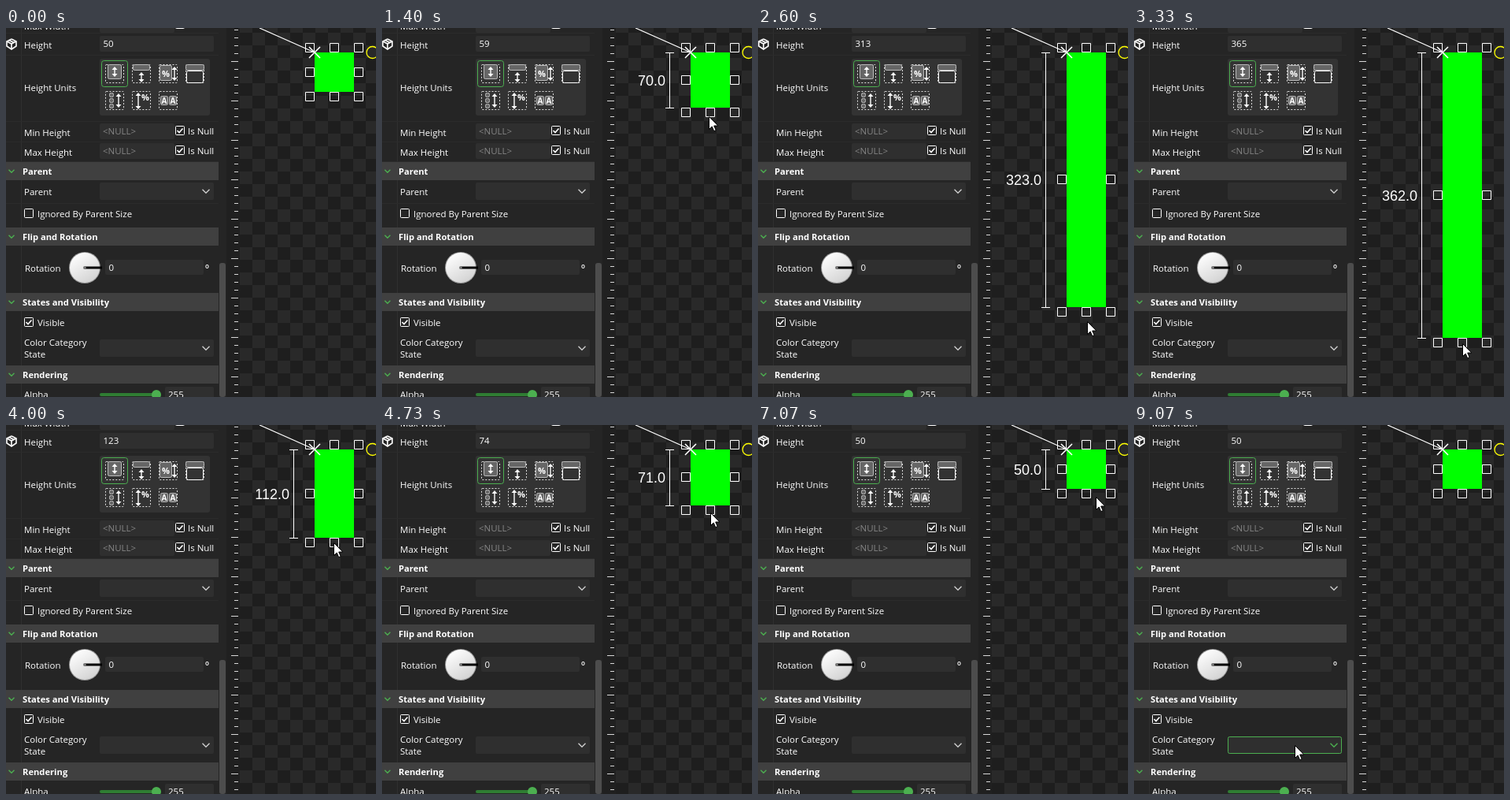
An HTML page with a canvas for the animation above (9140 ms loop, 470 by 468 pixels).

```html
<!DOCTYPE html>
<html lang="en">
<head>
<meta charset="utf-8">
<title>Height resize</title>
<style>
  html, body { margin: 0; width: 100%; height: 100%; overflow: hidden; background: #252525; }
  canvas { display: block; }
</style>
</head>
<body>
<canvas id="stage" width="470" height="468"></canvas>
<script>
const ctx = document.getElementById('stage').getContext('2d');
const LOOP = 9140, STEP = 200 / 3, LAST = 136;
const GREEN = '#4caf50', INK = '#fff', FIELD = '#2f2f2f';

// step, cursor x, cursor y, box height
const track = [
  [1, 462, 196, 50], [11, 412, 89, 50], [12, 412, 89, 50], [15, 416, 89, 50],
  [18, 416, 89, 50], [31, 419, 301, 237], [47, 418, 407, 367], [50, 418, 401, 362],
  [60, 417, 150, 112], [64, 417, 139, 99], [74, 418, 104, 63], [84, 419, 96, 55],
  [88, 419, 95, 54], [92, 419, 95, 54], [99, 422, 93, 51], [104, 422, 93, 51],
  [105, 426, 92, 50], [106, 430, 92, 50], [112, 430, 92, 50], [122, -14, 407, 50],
  [134, 214, 500, 50], [135, 210, 455, 50], [136, 205, 407, 50]
];

const slope = (i, c) => (track[i + 1][c] - track[i][c]) / (track[i + 1][0] - track[i][0]);
function tangent(i, c) {
  if (i < 1 || i >= track.length - 1) return 0;
  const a = slope(i - 1, c), b = slope(i, c);
  return a * b > 0 ? 2 * a * b / (a + b) : 0;
}

// Monotone cubic through the track
function sample(k, c) {
  if (k <= track[0][0]) return track[0][c];
  let i = 0;
  while (i < track.length - 2 && k > track[i + 1][0]) i++;
  const span = track[i + 1][0] - track[i][0], u = (k - track[i][0]) / span, v = 1 - u;
  return Math.round(v * v * (1 + 2 * u) * track[i][c] + u * u * (3 - 2 * u) * track[i + 1][c]
    + span * u * v * (v * tangent(i, c) - u * tangent(i + 1, c)));
}

function fill(x, y, w, h, color, r = 0) {
  ctx.fillStyle = color;
  ctx.beginPath();
  ctx.roundRect(x, y, w, h, r);
  ctx.fill();
}

function frame(x, y, w, h, color = INK, r = 0) {
  ctx.strokeStyle = color;
  ctx.lineWidth = 1;
  ctx.beginPath();
  ctx.roundRect(x + .5, y + .5, w - 1, h - 1, r);
  ctx.stroke();
}

function path(points, color = INK, width = 1) {
  ctx.strokeStyle = color;
  ctx.lineWidth = width;
  ctx.beginPath();
  for (let i = 0; i < points.length; i += 2) ctx.lineTo(points[i], points[i + 1]);
  ctx.stroke();
}

function disc(x, y, r, color) {
  ctx.fillStyle = color;
  ctx.beginPath();
  ctx.arc(x, y, r, 0, 7);
  ctx.fill();
}

function text(s, x, y, { color = INK, font = '500 11.5px "Open Sans", sans-serif', align = 'left' } = {}) {
  ctx.font = font;
  ctx.fillStyle = color;
  ctx.textAlign = align;
  ctx.fillText(s, x, y);
}

const chevron = (x, y, r, color) => path([x - r, y - r / 2, x, y + r / 2, x + r, y - r / 2], color, 1.4);

function checkbox(x, y, on) {
  frame(x, y, 12, 12, INK, 1);
  if (on) path([x + 2.5, y + 6, x + 5, y + 8.5, x + 9.5, y + 3.5], INK, 1.6);
}

function combo(y, hot) {
  fill(119, y, 145, 22, FIELD, 2);
  if (hot) frame(119, y, 145, 22, GREEN, 2);
  chevron(254, y + 11, 4.5, hot ? GREEN : '#ccc');
}

function header(s, y) {
  fill(0, y, 270, 23, '#404040');
  chevron(7, y + 11.5, 3.5, GREEN);
  text(s, 21, y + 16, { font: '700 11.2px "Open Sans", sans-serif' });
}

function nullable(s, y) {
  text(s, 23, y + 4);
  fill(119, y - 12, 95, 20, FIELD, 2);
  text('<NULL>', 123, y + 2, { color: '#858585' });
  checkbox(215, y - 9, true);
  text('Is Null', 231, y + 2);
}

function updown(x, top, bottom) {
  path([x, top + 3, x, bottom - 3], INK, 1.4);
  ctx.fillStyle = INK;
  for (const [tip, base] of [[top, top + 4], [bottom, bottom - 4]]) {
    ctx.beginPath();
    ctx.moveTo(x, tip);
    ctx.lineTo(x + 3.5, base);
    ctx.lineTo(x - 3.5, base);
    ctx.fill();
  }
}

function icon(x, y, draw) {
  ctx.save();
  ctx.translate(x, y);
  ctx.setLineDash([2, 2]);
  frame(-12, -12, 24, 24, '#e0e0e0', 1);
  ctx.setLineDash([]);
  draw();
  ctx.restore();
}

function block(x, y, w, h) {
  fill(x, y, w, h, '#666', 2);
  frame(x, y, w, h, '#bbb', 2);
}

const glyph = (s, x, y, size) =>
  text(s, x, y, { font: `700 ${size}px "Open Sans", sans-serif`, align: 'center' });

function unitIcons() {
  fill(119, 39, 140, 72, '#333', 3);
  frame(121, 41, 34, 34, GREEN, 3);
  icon(138, 58, () => { block(-9, -12, 18, 19); updown(0, -9, 4); });
  icon(172, 58, () => { block(-11, -12, 22, 8); updown(0, -2, 11); });
  icon(206, 58, () => { block(-11, -11, 16, 20); glyph('%', -3, 4, 11); updown(8, -9, 9); });
  icon(240, 58, () => { block(-12, -12, 24, 8); frame(-11, -4, 22, 16, INK, 2); });
  icon(138, 92, () => { for (const y of [-10, -3, 4]) block(-7, y, 6, 6); updown(5, -9, 9); });
  icon(172, 92, () => { updown(-4, -10, 11); glyph('%', 5, 0, 11); });
  icon(206, 92, () => {
    for (const x of [-10, 1]) { block(x, -6, 10, 12); glyph('A', x + 5, 4, 10); }
  });
}

function cube() {
  path([7, 14, 13, 17, 13, 23, 7, 27, 1, 23, 1, 17, 7, 14], INK, 1.6);
  path([1, 17, 7, 20, 13, 17], INK, 1.6);
  path([7, 20, 7, 27], INK, 1.6);
  path([4, 15.5, 10, 18.5], INK, 1.6);
}

function dial() {
  const shade = ctx.createLinearGradient(88, 286, 110, 322);
  shade.addColorStop(0, '#fff');
  shade.addColorStop(1, '#d2d2d2');
  disc(100, 304, 20, '#999');
  disc(100, 304, 19, shade);
  path([100, 304, 122, 304], '#000', 3);
  disc(100, 304, 2, '#777');
}

function panel(height, hot) {
  fill(0, 0, 280, 468, '#252525');
  fill(19, 0, 1, 468, '#303030');
  for (const y of [6, 34, 118, 144, 169, 222]) fill(0, y, 270, 1, '#2b2b2b');
  nullable('Max Width', -2);
  cube();
  text('Height', 23, 26);
  fill(119, 10, 145, 20, FIELD, 2);
  text(height, 123.5, 23.5);
  text('Height Units', 23, 80);
  unitIcons();
  nullable('Min Height', 133);
  nullable('Max Height', 158);

  header('Parent', 170);
  text('Parent', 23, 212);
  combo(196);
  checkbox(23, 229);
  text('Ignored By Parent Size', 40, 240);

  header('Flip and Rotation', 253);
  text('Rotation', 24, 309);
  dial();
  fill(126, 294, 125, 19, FIELD, 2);
  text('0', 130.5, 308);
  text('º', 253, 309, { font: '600 13px "Open Sans", sans-serif' });

  header('States and Visibility', 336);
  checkbox(23, 367, true);
  text('Visible', 40, 378);
  text('Color Category', 23, 403);
  text('State', 23, 418);
  combo(395, hot);

  header('Rendering', 428);
  text('Alpha', 23, 469);
  fill(119, 463, 72, 4, '#2f7d33', 2);
  disc(191, 465, 6, GREEN);
  fill(202, 455, 62, 20, FIELD, 2);
  text('255', 206, 469);
  fill(271, 298, 8, 170, '#4d4d4d', 3);
}

function backdrop() {
  fill(280, 0, 190, 468, '#1e1e1e');
  for (let y = 0; y < 30; y++)
    for (let x = y % 2; x < 11; x += 2) fill(297 + x * 16, y * 16 - 10, 16, 16, '#292929');
  fill(280, 0, 17, 468, '#202020');
  for (let y = 2; y < 468; y += 10) {
    const size = y % 50 === 42 ? 9 : 5;
    fill(295 - size, y, size, 1, '#d8d8d8');
  }
}

function shape(h, measured) {
  fill(392, 31, 50, h, '#0f0');
  for (const x of [386, 417, 448])
    for (const y of [25, 31 + h / 2, h + 37])
      if (x !== 417 || y !== 31 + h / 2) frame(x - 6, Math.floor(y) - 6, 12, 12);
  path([322, 0, 392, 31], INK, 1.2);
  path([385, 24, 399, 38], INK, 1.6);
  path([385, 38, 399, 24], INK, 1.6);
  ctx.strokeStyle = '#ff0';
  ctx.lineWidth = 1.3;
  ctx.beginPath();
  ctx.arc(465.5, 31, 7.5, 0, 7);
  ctx.stroke();
  if (!measured) return;
  fill(365, 31, 1, h, INK);
  fill(360, 31, 11, 1, INK);
  fill(360, 31 + h, 11, 1, INK);
  text(h.toFixed(1), 360, Math.floor(38 + h / 2),
    { font: '18px "Liberation Sans", Arial, sans-serif', align: 'right' });
}

const arrow = new Path2D('M0 0V16L3.7 12.5 6.2 18.2 8.7 17.1 6.2 11.5H11.3Z');
const resize = new Path2D('M0-11 4.5-6H1V6H4.5L0 11-4.5 6H-1V-6H-4.5Z');
function cursor(x, y, glyphPath) {
  ctx.save();
  ctx.translate(x - .5, y - .5);
  ctx.strokeStyle = '#000';
  ctx.lineWidth = 1;
  ctx.fillStyle = INK;
  ctx.fill(glyphPath);
  ctx.stroke(glyphPath);
  ctx.restore();
}

function render(k) {
  backdrop();
  shape(sample(k, 3), k >= 9 && k < 115);
  panel(sample(k - 1, 3), k === LAST);
  if (k > 0 && (k < 123 || k > 134))
    cursor(sample(k, 1), sample(k, 2), k >= 9 && k < 19 ? resize : arrow);
}

let shown = -1;
function tick() {
  const k = Math.min(LAST, Math.floor((performance.now() % LOOP + 5) / STEP));
  if (k !== shown) render(shown = k);
  requestAnimationFrame(tick);
}
tick();
</script>
</body>
</html>
```
